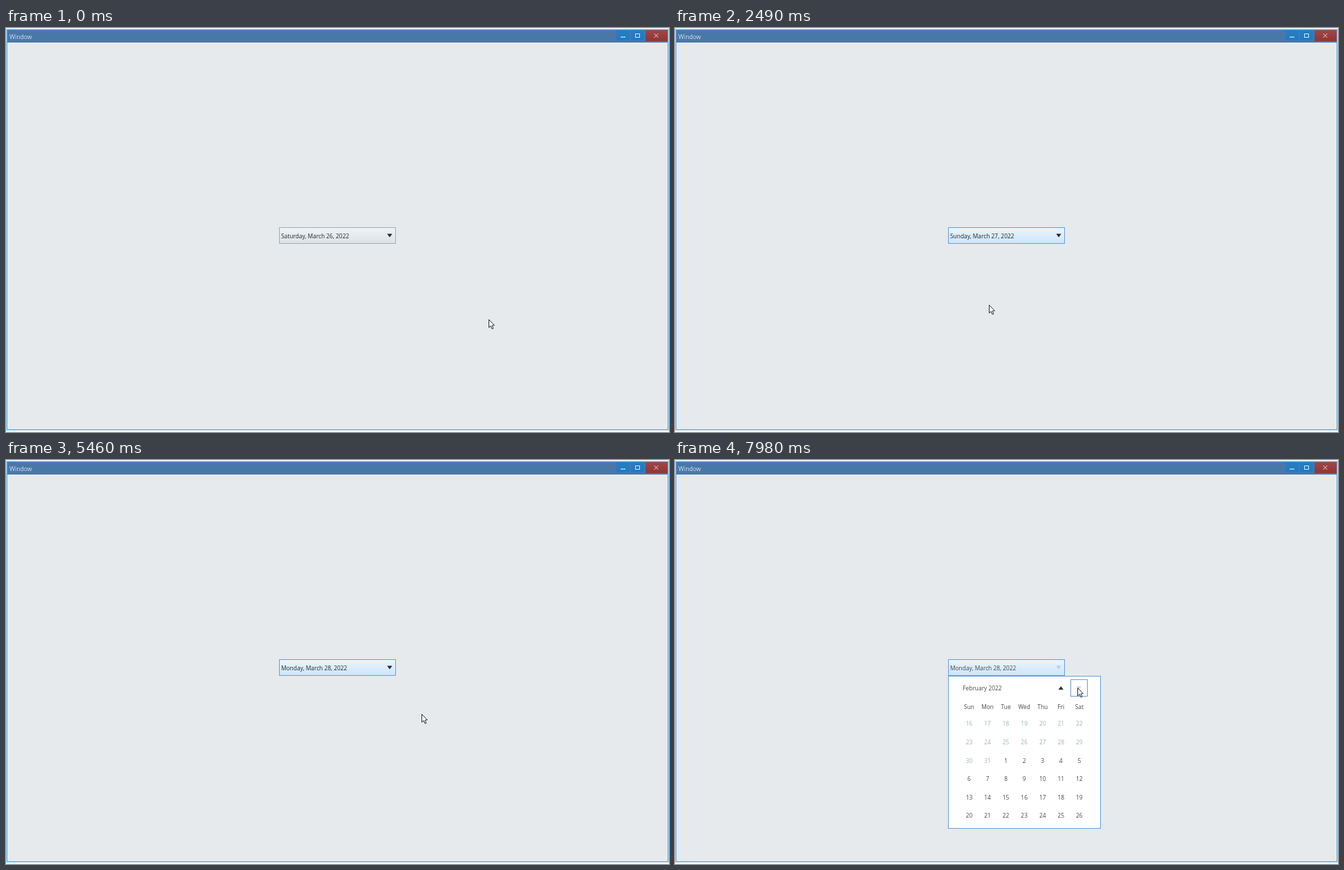
An HTML page with a canvas that plays this animation: 959 px wide and 584 px high, repeating every 8000 ms.

```html
<!DOCTYPE html>
<html lang="en">
<head>
<meta charset="utf-8">
<title>Date picker</title>
<style>
html, body { margin: 0; width: 100%; height: 100%; overflow: hidden; background: #fff; }
canvas { display: block; }
</style>
</head>
<body>
<canvas id="stage" width="959" height="584"></canvas>
<script>
const ctx = document.getElementById('stage').getContext('2d');
const LOOP = 8000, PITCH = 26.55, BOX = 25;
const SCROLL = 380, PRESS = 120, REACT = 80, SETTLE = 90;
const DARK = '#25282b', INK = '#45494d', PALE = '#9fb3b6', BLUE = '#6a9fd6', HOT = '#4d9be2';
const MONTHS = ['January', 'February', 'March'];

// Calendar grid; week 0 starts on Sunday 26 Dec 2021
const colX = c => 425.5 + c * PITCH;
const rowY = r => 383 + r * PITCH;
const colAt = x => Math.round((x - colX(0)) / PITCH);
const rowAt = y => Math.round((y - rowY(0)) / PITCH);
const dateAt = (week, col) => new Date(2021, 11, 26 + week * 7 + col);
const firstWeek = month =>
  Math.floor(Math.round((new Date(2022, month, 1) - dateAt(0, 0)) / 864e5) / 7);

const onCombo = (x, y) => x >= 395 && x < 564 && y >= 288 && y < 312;
const onButton = (x, y, left) => x >= left && x < left + BOX && y >= 317 && y < 342;

// Pointer moves; a click follows shortly after arrival
const move = (start, end, x, y, click) => ({ start, end, x, y, click });
const MOVES = [
  move(0, 0, 699, 422),
  move(0, 700, 499, 300, true),
  move(1200, 1700, 494, 475),
  move(1800, 2060, 427, 487, true),
  move(2300, 3430, 490, 282),
  move(3430, 3660, 494, 298, true),
  move(4000, 4645, 455, 486, true),
  move(4860, 5070, 695, 444),
  move(5400, 5675, 518, 298, true),
  move(5980, 6310, 564, 330, true),
  move(7090, 7090, 564, 330, true),
  move(7400, 7667, 582, 329, true)
];
const CLICKS = MOVES.filter(m => m.click).map(m => ({ at: m.end + SETTLE, x: m.x, y: m.y }));

function pointerAt(t) {
  const past = MOVES.filter(m => m.start <= t);
  const to = past.pop(), from = past.pop() || to;
  const left = to.end > to.start ? Math.max(0, (to.end - t) / (to.end - to.start)) : 0;
  const p = 1 - left ** 3;
  return [from.x + (to.x - from.x) * p, from.y + (to.y - from.y) * p];
}

// Replays the clicks made up to time t
function stateAt(t) {
  const s = { open: false, day: 26, month: 2, week: firstWeek(2), touched: false };
  for (const { at, x, y } of CLICKS) {
    const since = t - at - REACT;
    if (since < 0) break;
    s.touched = true;
    if (onCombo(x, y)) s.open = true;
    else if (y < 342) {
      const before = firstWeek(s.month);
      s.month += onButton(x, y, 546) ? -1 : 1;
      const left = 1 - Math.min(1, since / SCROLL);
      s.week = firstWeek(s.month) + (before - firstWeek(s.month)) * left * left;
    } else {
      s.day = dateAt(firstWeek(s.month) + rowAt(y), colAt(x)).getDate();
      s.open = false;
    }
  }
  return s;
}

function fill(color, x, y, w, h) {
  ctx.fillStyle = color;
  ctx.fillRect(x, y, w, h);
}

function outline(color, x, y, w, h) {
  ctx.strokeStyle = color;
  ctx.lineWidth = 1;
  ctx.strokeRect(x + .5, y + .5, w - 1, h - 1);
}

function text(str, x, y, color, align = 'left', size = 8.4) {
  ctx.font = `${size}px "Open Sans", "Noto Sans", sans-serif`;
  ctx.textAlign = align;
  ctx.fillStyle = color;
  ctx.fillText(str, x, y);
}

function shape(points, color) {
  ctx.beginPath();
  points.forEach(([x, y]) => ctx.lineTo(x, y));
  ctx.closePath();
  ctx.fillStyle = color;
  ctx.fill();
}

const arrow = (x, y, dir, color) =>
  shape([[x - 3.7, y - 2.5 * dir], [x + 3.7, y - 2.5 * dir], [x, y + 2.5 * dir]], color);

function vertical(y0, y1, c0, c1) {
  const g = ctx.createLinearGradient(0, y0, 0, y1);
  g.addColorStop(0, c0);
  g.addColorStop(1, c1);
  return g;
}

function drawWindow() {
  fill('#fff', 0, 0, 959, 584);
  outline('#b4dcf9', 0, 1, 959, 581);
  fill('#e6eaed', 1, 2, 957, 579);
  fill('#4a77aa', 2, 3, 955, 18);
  outline('#4fabf0', 1, 2, 957, 579);
  text('Window', 5, 15.5, '#d5e0eb', 'left', 8.6);
  for (const x of [883, 904]) fill(vertical(3, 18, '#2a7dbd', '#1b7cc6'), x, 3, 19, 15);
  fill(vertical(3, 19, '#a04646', '#913535'), 925, 3, 32, 16);
  fill('#c9dff1', 889, 12.5, 7, 1.3);
  outline('#d2e5f4', 910, 8, 7, 6);
  ctx.beginPath();
  ctx.moveTo(937.5, 8); ctx.lineTo(943.5, 14);
  ctx.moveTo(943.5, 8); ctx.lineTo(937.5, 14);
  ctx.strokeStyle = '#e6d0d0';
  ctx.stroke();
}

function drawCombo(date, focused, active) {
  fill(focused ? vertical(289, 311, '#ebf5fe', '#cde5fa') : vertical(289, 311, '#f0f3f5', '#dde2e6'),
    395, 289, 169, 22);
  outline(focused ? BLUE : '#a3adb6', 395, 288, 169, 24);
  text(date, 398, 304, active ? INK : DARK);
  arrow(555, 300, 1, active ? '#b5d0e6' : DARK);
}

function drawCell(date, x, y, month, selected, hovered) {
  const today = date.getMonth() === 2 && date.getDate() === 26;
  const left = Math.round(x - 12.6), top = Math.round(y - 12.6);
  let color = date.getMonth() === month ? INK : PALE;
  if (today) {
    fill('#4a80c0', left, top, BOX, BOX);
    if (selected) outline('#e3edf8', left + 1, top + 1, BOX - 2, BOX - 2);
    color = '#dce8f5';
  } else if (selected || hovered) {
    outline(hovered ? HOT : BLUE, left, top, BOX, BOX);
    if (hovered) color = '#929ba4';
  }
  text(date.getDate(), x, y + 3.3, color, 'center');
}

function drawPopup(s, px, py) {
  fill('#fff', 395, 312, 221, 221);
  outline(onCombo(px, py) ? '#aab3bb' : BLUE, 395, 312, 221, 221);

  text(MONTHS[s.month] + ' 2022', 416.3, 333, INK);
  for (const [left, dir] of [[546, -1], [572, 1]]) {
    const hot = onButton(px, py, left);
    if (hot) outline(BLUE, left, 317, BOX, BOX);
    arrow(left + 12.2, 329.5, dir, hot ? '#c3d8ea' : '#303336');
  }
  ['Sun', 'Mon', 'Tue', 'Wed', 'Thu', 'Fri', 'Sat']
    .forEach((d, c) => text(d, colX(c), 360, INK, 'center'));

  ctx.save();
  ctx.beginPath();
  ctx.rect(410, 370, 190, 159);
  ctx.clip();
  for (let week = Math.floor(s.week); week <= s.week + 6; week++) {
    const y = rowY(week - s.week);
    for (let c = 0; c < 7; c++) {
      const date = dateAt(week, c);
      const chosen = date.getMonth() === 2 && date.getDate() === s.day;
      const hot = py > 370 && c === colAt(px) && Math.abs(py - y) < PITCH / 2;
      drawCell(date, colX(c), y, s.month, chosen, hot);
    }
  }
  ctx.restore();
}

function drawPointer(x, y, pressed) {
  if (pressed) {
    ctx.beginPath();
    ctx.arc(x, y + 1, 9, 0, Math.PI * 2);
    ctx.fillStyle = 'rgba(255, 240, 40, .75)';
    ctx.fill();
  }
  const tip = [[.5, .5], [.5, 12], [3.2, 9.6], [5, 14], [6.9, 13.2], [5.1, 9], [8.4, 8.7]];
  shape(tip.map(([a, b]) => [x + a, y + b]), '#fff');
  ctx.strokeStyle = '#2b2b2b';
  ctx.lineWidth = 1;
  ctx.stroke();
}

function draw(t) {
  const [x, y] = pointerAt(t).map(Math.round);
  const s = stateAt(t), over = onCombo(x, y);
  const date = new Date(2022, 2, s.day).toLocaleDateString('en-US',
    { weekday: 'long', month: 'long', day: 'numeric', year: 'numeric' });
  drawWindow();
  drawCombo(date, over || s.touched, over || s.open);
  if (s.open) drawPopup(s, x, y);
  drawPointer(x, y, CLICKS.some(c => t >= c.at && t < c.at + PRESS));
}

const begin = performance.now();
function tick() {
  draw((performance.now() - begin) % LOOP);
  requestAnimationFrame(tick);
}
tick();
</script>
</body>
</html>
```
